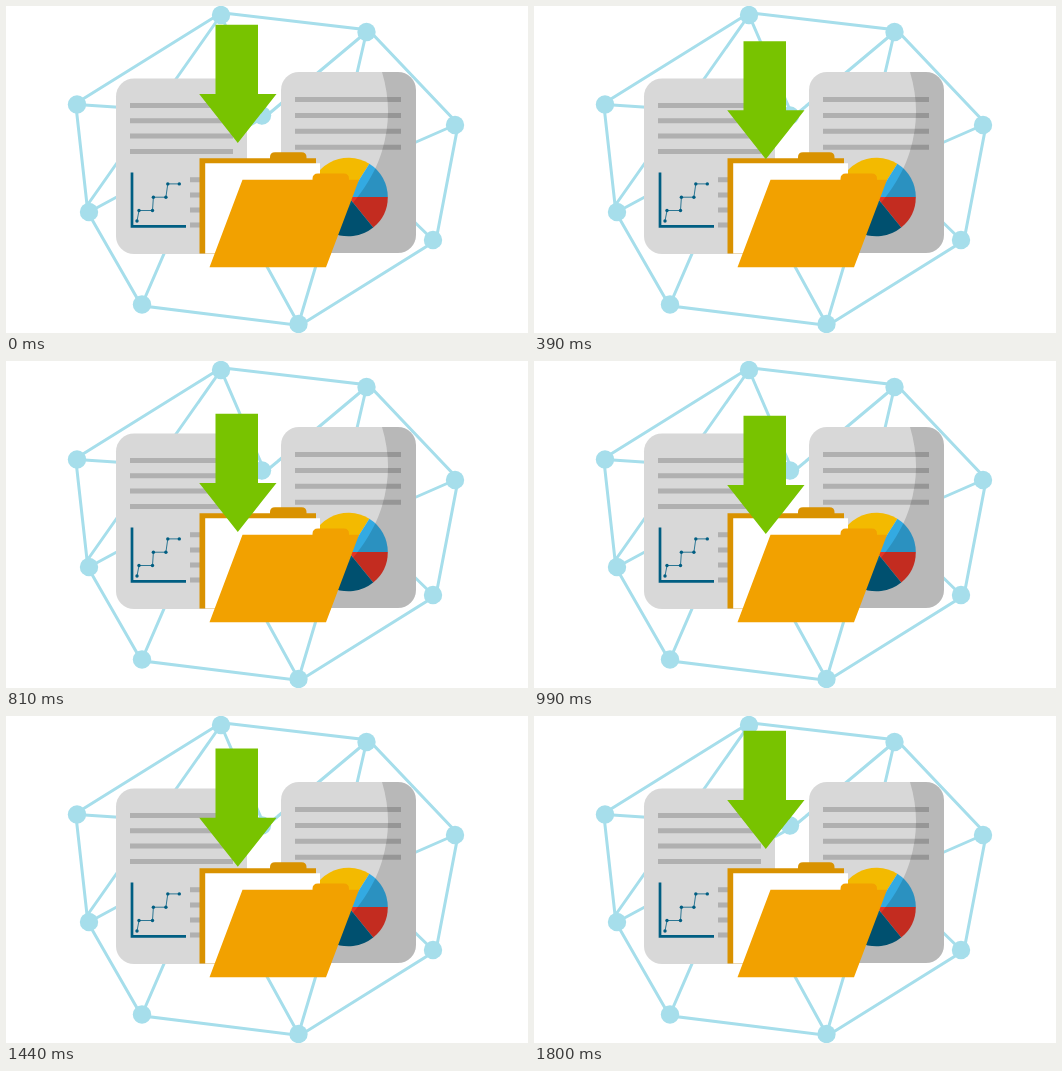
Animation, 522 px wide and 327 px high, one loop 1830 ms. Source, as an HTML page:

```html
<!DOCTYPE html>
<html lang="en">
<head>
<meta charset="utf-8">
<title>Download to folder</title>
<style>
html, body { margin: 0; width: 100%; height: 100%; overflow: hidden; background: #fff; }
svg { display: block; width: 522px; height: 327px; }
</style>
</head>
<body>
<svg viewBox="0 0 522 327">
  <defs>
    <clipPath id="page"><rect x="275" y="66" width="135" height="181" rx="18"/></clipPath>
  </defs>

  <path id="links" stroke="#a6deeb" stroke-width="3" fill="none"/>
  <g id="nodes" fill="#a6deeb"></g>

  <!-- left page -->
  <rect x="110" y="72.5" width="131" height="175.5" rx="18" fill="#d8d8d8"/>
  <path id="leftText" stroke="#b0b0b0" stroke-width="5"/>
  <g stroke="#005e82" fill="none">
    <path d="M126 166.5V220.3H180" stroke-width="2.7"/>
    <path id="trend" opacity=".8"/>
  </g>
  <g id="dots" fill="#005e82"></g>

  <!-- right page, with its shaded side -->
  <g clip-path="url(#page)">
    <path d="M275 66H410V247H275Z" fill="#d8d8d8"/>
    <path id="rightText" stroke="#b0b0b0" stroke-width="5"/>
    <g id="pie"></g>
    <path d="M376 66C384 93 384 118 376 145C368 172 348 202 310 232V247H410V66Z" opacity=".15"/>
  </g>

  <!-- folder -->
  <path d="M193.5 247.5V152.3H264V151Q264 146.2 269 146.2H295.5Q300.5 146.2 300.5 151V152.3H310V247.5Z" fill="#d99200"/>
  <path d="M199.2 157.3H314V247.5H199.2Z" fill="#fff"/>
  <path d="M306.5 176V173Q306.5 167.5 312 167.5H338Q343 167.5 343 173V173.7H353L320 261.3H203.5L236.5 173.7H306.5Z" fill="#f2a100"/>

  <path id="arrow" d="M209.5 0H252V69.2H270.5L231.8 118.2L193.2 69.2H209.5Z" fill="#78c300"/>
</svg>
<script>
const $ = id => document.getElementById(id);
const setPath = (id, d) => $(id).setAttribute('d', d);
const circles = (pts, r) => pts.map(([x, y]) => `<circle cx="${x}" cy="${y}" r="${r}"/>`).join('');
const textLines = (x, right, y, gap) =>
  [0, 1, 2, 3].map(i => `M${x} ${y + i * gap}H${right}`).join('');

// Network: an outline slightly larger than the ring of nodes, spokes to the hub, links behind the pages
const ring = [[215, 9], [360.5, 26], [449, 119], [427, 234], [292.5, 318], [136, 298.5], [83, 206], [71, 98.5]];
const outline = ring.map(([x, y]) => [x + (x - 180) * .012, y + (y - 190) * .012]);
const spokes = [0, 1, 6, 7].map(i => `M${ring[i]}L259 111`);
const hidden = [[0, 80, 201], [1, 342, 106], [2, 385, 147], [3, 390, 198], [4, 242, 226], [4, 320, 226], [5, 180, 197]]
  .map(([i, x, y]) => `M${ring[i]}L${x} ${y}`);
setPath('links', `M${outline.join('L')}Z` + spokes.join('') + hidden.join(''));
$('nodes').innerHTML = circles([...ring, [256, 109.5]], 9.2);

setPath('leftText', textLines(124, 227, 99.5, 15.3) + textLines(184, 227, 173.8, 15.1));
setPath('rightText', textLines(289, 395, 93.5, 15.9));

// Chart: a staircase of three steps
const trend = [[131, 215]];
for (let i = 0; i < 3; i++) {
  const y = 204.5 - 13.3 * i;
  trend.push([133 + 14.4 * i, y], [146.5 + 13.4 * i, y]);
}
setPath('trend', 'M' + trend.join('L'));
$('dots').innerHTML = circles(trend, 1.7);

// Slices as [start, end, colour], in degrees clockwise from the right
const rim = deg => {
  const a = deg * Math.PI / 180;
  return [342.5 + 39.3 * Math.cos(a), 191 + 39.3 * Math.sin(a)];
};
$('pie').innerHTML = [[0, 51, '#e53426'], [51, 180, '#005e82'], [180, 302, '#f3ba00'], [302, 360, '#33aae2']]
  .map(([from, to, fill]) =>
    `<path d="M342.5 191L${rim(from)}A39.3 39.3 0 0 1 ${rim(to)}Z" fill="${fill}"/>`).join('');

const LOOP = 1830, STEP = 30, TURN = 930, LAST = LOOP - STEP;
const START = 18.8, LOW = 57.8, END = 14.8;
const mix = (a, b, k) => a + (b - a) * k;

function draw(now) {
  const t = Math.floor(now % LOOP / STEP) * STEP;
  const y = t < TURN ? mix(START, LOW, t / TURN) : mix(LOW, END, (t - TURN) / (LAST - TURN));
  $('arrow').setAttribute('transform', `translate(0 ${y})`);
  requestAnimationFrame(draw);
}
draw(0);
</script>
</body>
</html>
```
